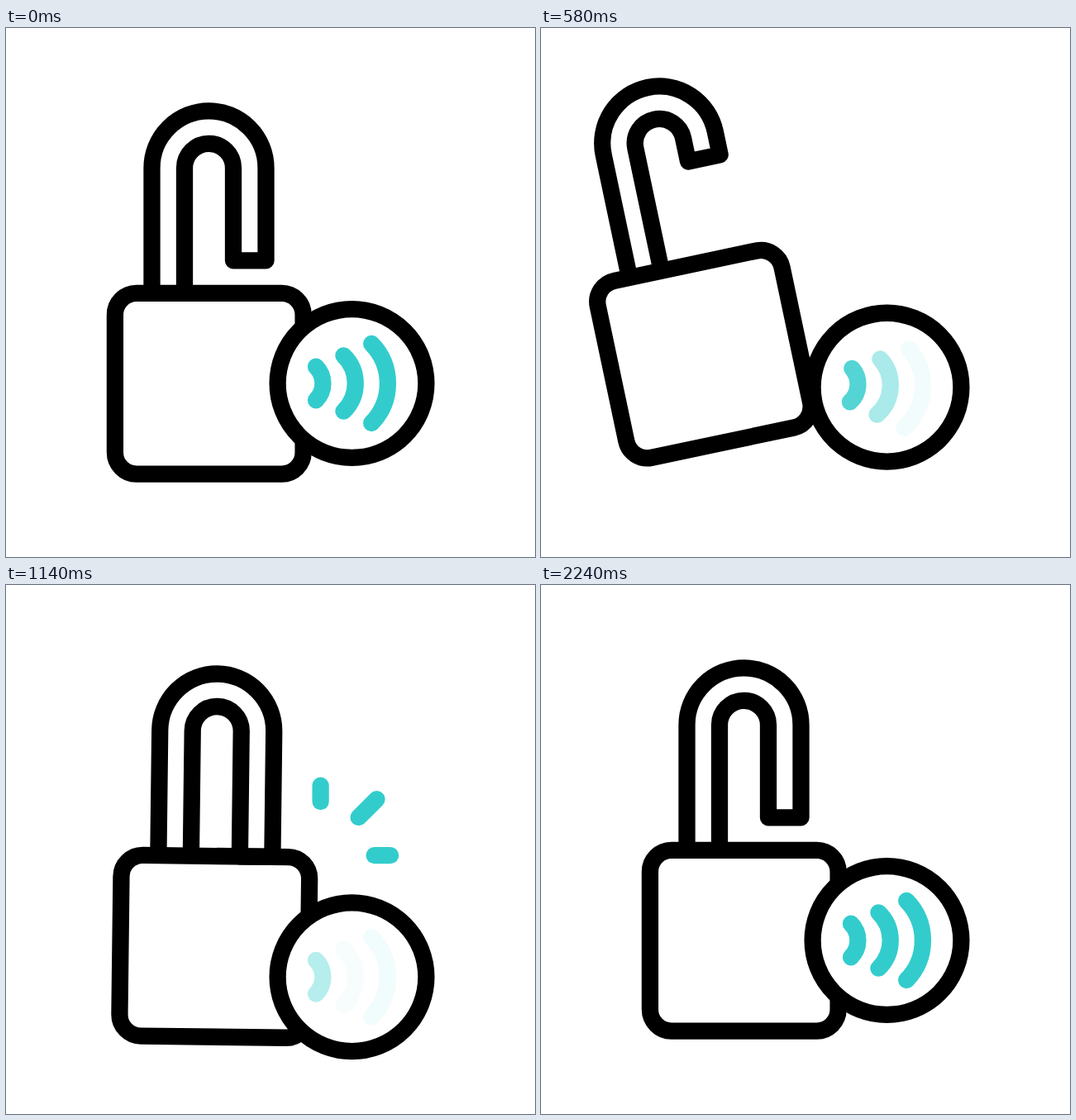
Animation, 640 px wide and 640 px high, one loop 2.4 s. Source, as an HTML page:

```html
<!DOCTYPE html>
<html lang="en">
<head>
<meta charset="utf-8">
<title>Contactless lock</title>
<style>
  html, body { margin: 0; width: 100%; height: 100%; overflow: hidden; background: #fff; }
  svg { display: block; width: 100%; height: 100%; }
  svg * { fill: none; stroke: #000; stroke-width: 20.3; stroke-linejoin: round; }
  #sparks path, #waves path { stroke: #3cc; stroke-linecap: round; }
  #disc { fill: #fff; }
</style>
</head>
<body>
<svg viewBox="0 0 640 640">
  <g id="lock">
    <path id="shackle"/>
    <rect x="131.9" y="320.9" width="227.7" height="218.7" rx="26"/>
  </g>
  <g id="sparks"><path/><path/><path/></g>
  <g id="badge">
    <circle id="disc" cx="418.5" cy="430" r="89.9"/>
    <g id="waves">
      <path d="M375 409.7a28.7 28.7 0 0 1 0 40.6"/>
      <path d="M408.4 396.3a46.8 46.8 0 0 1 0 67.4"/>
      <path d="M442.2 382a68.3 68.3 0 0 1 0 96"/>
    </g>
  </g>
</svg>
<script>
const LOOP = 2400, STEP = 20;
const WIND_UP = 605, LOCK_BEAT = 343, BADGE_BEAT = 367;
const PULSE = 669, PULSE_LAG = 96, PULSES = 3;
const BODY_TOP = 321;

const $ = s => document.querySelector(s);
const lock = $('#lock'), shackle = $('#shackle'), badge = $('#badge'), waves = $('#waves');
const rays = [...$('#sparks').children], arcs = [...waves.children];

// One value per beat: rest, lean back, slam shut, bounce, rest
const lockPath = {
  x: [0, -49, -1, 14, 0],
  y: [0, -36.1, 41, -26.5, 0],
  turn: [0, -12.1, 6.25, -4.8, 0],
  foot: [281.4, 197, 332, 321, 281.4]
};
const badgePath = {
  y: [0, 54, -25, 46, -19, 14, 0],
  turn: [0, -16.7, 15.3, 0, -3.4, 1.4, 0]
};

const clamp = (v, lo = 0, hi = 1) => Math.min(hi, Math.max(lo, v));
const ease = p => (1 - Math.cos(Math.PI * p)) / 2;
const ramp = (t, from, to) => ease(clamp((t - from) / (to - from)));

function at(values, beat) {
  const b = clamp(beat, 0, values.length - 1);
  const i = Math.min(Math.floor(b), values.length - 2);
  return values[i] + (values[i + 1] - values[i]) * ease(b - i);
}

function drawLock(t) {
  const s = t - STEP;
  const beat = s < WIND_UP ? s / WIND_UP : 1 + (s - WIND_UP) / LOCK_BEAT;
  const { x, y, turn, foot } = lockPath;
  const end = Math.min(at(foot, beat), BODY_TOP);
  lock.setAttribute('transform',
    `translate(${at(x, beat)} ${at(y, beat)}) rotate(${at(turn, beat)} 245.75 430.25)`);
  shackle.setAttribute('d',
    `M176.5 ${BODY_TOP}V169.4a69 69 0 0 1 138 0V${end}H275V169.4a29.5 29.5 0 0 0-59 0V${BODY_TOP}`);
}

function drawSparks(t) {
  const head = ramp(t, 965, 1100), tail = ramp(t, 1160, 1300);
  rays.forEach((ray, i) => {
    const a = (i - 2) * Math.PI / 4, length = i === 1 ? 31 : 19.5;
    const point = p => {
      const r = 65 + length * p;
      return `${380.6 + r * Math.cos(a)} ${327.1 + r * Math.sin(a)}`;
    };
    ray.setAttribute('d', `M${point(tail)}L${point(head)}`);
    ray.style.display = head > tail ? '' : 'none';
  });
}

function drawBadge(t) {
  const beat = t / BADGE_BEAT;
  badge.setAttribute('transform', `translate(0 ${at(badgePath.y, beat)})`);
  waves.setAttribute('transform', `rotate(${at(badgePath.turn, beat)} 418.5 430)`);
  arcs.forEach((arc, i) => {
    const phase = clamp((t - i * PULSE_LAG) / PULSE, 0, PULSES);
    arc.style.opacity = (1 + Math.cos(2 * Math.PI * phase)) / 2;
  });
}

const start = performance.now();
function tick() {
  const time = (performance.now() - start) % LOOP;
  const t = Math.floor(time / STEP) * STEP;
  drawLock(t);
  drawSparks(t);
  drawBadge(t);
  requestAnimationFrame(tick);
}
tick();
</script>
</body>
</html>
```
